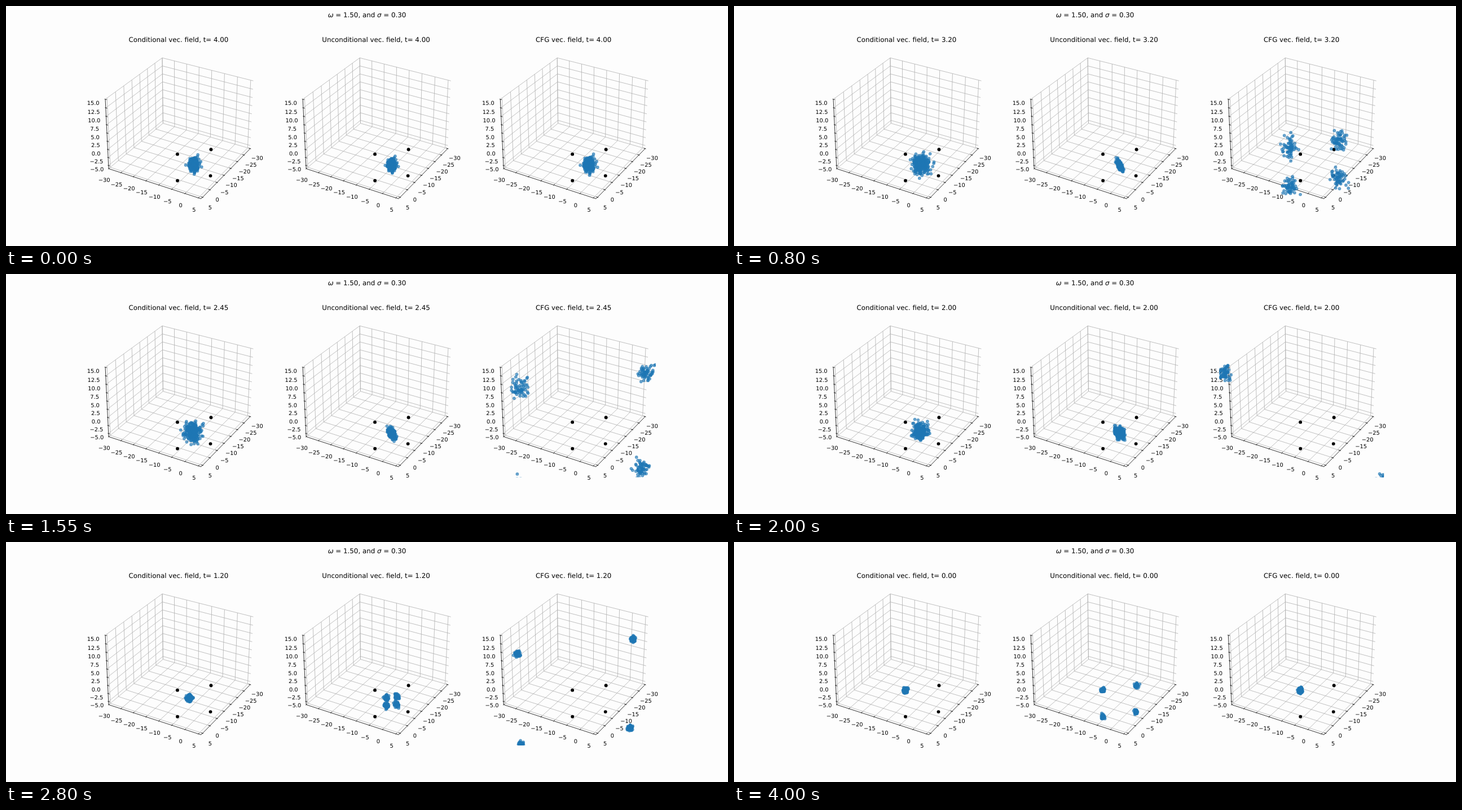
Recreate the animation shown at these times as an HTML page. Size 1280 px wide and 427 px high, loop 4050 ms.

```html
<!DOCTYPE html>
<html lang="en">
<head>
<meta charset="utf-8">
<title>Guided vector fields</title>
<style>
  html, body { margin: 0; width: 100%; height: 100%; overflow: hidden; background: #fdfdfd; }
  svg { display: block; width: 100vw; height: 100vh; }
  text { font-family: "DejaVu Sans", sans-serif; font-size: 9.877px; text-anchor: middle; text-rendering: geometricPrecision; }
  .title { font-size: 11.852px; }
  .grid { fill: none; stroke: #b0b0b0; stroke-width: .79; }
  .axis { fill: none; stroke: #000; stroke-width: .79; }
  .dot { fill: #1f77b4; fill-opacity: .6; stroke: #1f77b4; stroke-opacity: .6; stroke-width: 1.4; }
</style>
</head>
<body>
<svg id="stage" viewBox="0 0 1280 427">
  <defs><clipPath id="box"><rect x="160" y="69.6" width="291.8" height="291.8"/></clipPath></defs>
  <text class="title" x="640" y="20.2"><tspan font-style="italic">ω</tspan> = 1.50, and <tspan font-style="italic">σ</tspan> = 0.30</text>
</svg>
<script>
const LOOP = 4050, STEP = 50, STEPS = 81, COUNT = 256, PITCH = 350.12;
const NAMES = ["Conditional", "Unconditional", "CFG"];
const MEANS = [[4, -4, 4], [-4, 4, 4], [-4, 4, -4], [4, -4, -4]];

// t, conditional spread, in-plane and normal spread, own pull, shared pull, guided spread
const KEYS = [
  [0, .3, .3, .3, 0, 1, .3],
  [.8, .33, .3, .32, 2.03, 1.17, .33],
  [1.2, .42, .36, .45, 3.33, .77, .4],
  [1.6, .7, .33, .85, 4.65, .58, .65],
  [2, 1.05, .3, 1.25, 4.8, .4, 1],
  [2.85, 1.35, .22, 1.6, 2.4, .24, 1.4],
  [3.2, 1.28, .22, 1.6, 1.47, .17, 1.3],
  [4, .87, .72, .9, 0, 0, .95]
];

const stage = document.getElementById("stage");

function add(parent, tag, attrs, text) {
  const el = document.createElementNS("http://www.w3.org/2000/svg", tag);
  for (const k in attrs) el.setAttribute(k, attrs[k]);
  if (text !== undefined) el.textContent = text;
  parent.appendChild(el);
  return el;
}

// Plot limits: x and y share theirs, z has its own
const LO = -30, HI = 6, BOT = -6, TOP = 15;
const U = (HI - LO) / 12, V = (TOP - BOT) / 12;

// Perspective camera at azimuth 30, elevation 30, distance 10
const C = Math.cos(Math.PI / 6), S = 0.5;
const side = v => ((v - LO) / (HI - LO) - .5) * 1.190476;
const height = v => ((v - BOT) / (TOP - BOT) - .5) * .892857;
function project(x, y, z) {
  const a = side(x), b = side(y), c = height(z);
  const k = 1577.1 / (10 - C * (C * a + S * b) - S * c);
  return [309.8 + k * (C * b - S * a), 211.6 - k * (C * c - S * (C * a + S * b))];
}

const path = pts => "M" + pts.map(p => project(...p).map(v => v.toFixed(2)).join(" ")).join("L");
const range = (a, b, s) => Array.from({ length: Math.round((b - a) / s) + 1 }, (_, i) => a + i * s);

function drawFrame(g) {
  const grid = [], axis = [], labels = [];
  const gap = .94 * U, drop = .94 * V, near = .2 * U, far = .1 * U;
  const label = (p, text) => labels.push([project(...p), text.replace("-", "\u2212")]);
  for (const v of range(-30, 5, 5)) {
    grid.push(path([[v, HI, BOT], [v, LO, BOT], [v, LO, TOP]]));
    grid.push(path([[HI, v, BOT], [LO, v, BOT], [LO, v, TOP]]));
    axis.push(path([[v, HI - near, BOT], [v, HI + far, BOT]]));
    axis.push(path([[HI - near, v, BOT], [HI + far, v, BOT]]));
    label([v, HI + gap, BOT - drop], String(v));
    label([HI + gap, v, BOT - drop], String(v));
  }
  for (const v of range(-5, 15, 2.5)) {
    grid.push(path([[HI, LO, v], [LO, LO, v], [LO, HI, v]]));
    axis.push(path([[HI, LO + near, v], [HI, LO - far, v]]));
    label([HI + gap, LO - gap, v], v.toFixed(1));
  }
  axis.push(path([[LO, HI, BOT], [HI, HI, BOT], [HI, LO, BOT], [HI, LO, TOP]]));
  add(g, "path", { class: "grid", d: grid.join("") });
  add(g, "path", { class: "axis", d: axis.join("") });
  for (const [[x, y], text] of labels)
    add(g, "text", { x: x.toFixed(2), y: (y + 7.7).toFixed(2) }, text);
}

let seed = 20417;
function random() {
  seed = (seed + 0x6D2B79F5) | 0;
  let r = Math.imul(seed ^ (seed >>> 15), 1 | seed);
  r = (r + Math.imul(r ^ (r >>> 7), 61 | r)) ^ r;
  return ((r ^ (r >>> 14)) >>> 0) / 4294967296;
}
const gauss = () => Math.sqrt(-2 * Math.log(1 - random())) * Math.cos(2 * Math.PI * random());

// Each panel follows its own correlated random walk from a shared start
const start = Float32Array.from({ length: COUNT * 3 }, gauss);
const KEEP = .92, KICK = Math.sqrt(1 - KEEP * KEEP);
const noise = NAMES.map(() => {
  const walk = [start];
  for (let i = 1; i < STEPS; i++) walk.push(walk[i - 1].map(v => KEEP * v + KICK * gauss()));
  return walk;
});

const panels = NAMES.map((name, i) => {
  const g = add(stage, "g", { transform: `translate(${(i * PITCH).toFixed(2)} 0)` });
  drawFrame(g);
  const title = add(g, "text", { class: "title", x: 305.9, y: 63.8 });
  const cloud = add(g, "g", { "clip-path": "url(#box)" });
  for (const mean of MEANS) {
    const [cx, cy] = project(...mean);
    add(cloud, "circle", { cx, cy, r: 2.95 });
  }
  const dots = Array.from({ length: COUNT }, () => add(cloud, "circle", { class: "dot", r: 2.2 }));
  return { name, title, dots };
});

// Cubic Hermite through the keys
function sample(t) {
  let i = 0;
  while (i < KEYS.length - 2 && t > KEYS[i + 1][0]) i++;
  const a = KEYS[i], b = KEYS[i + 1], h = b[0] - a[0], u = (t - a[0]) / h;
  const slope = (j, c) => {
    const p = KEYS[Math.max(j - 1, 0)], q = KEYS[Math.min(j + 1, KEYS.length - 1)];
    return (q[c] - p[c]) / (q[0] - p[0]);
  };
  return a.map((v, c) => {
    const d = b[c] - v, m = slope(i, c) * h, n = slope(i + 1, c) * h;
    return v + u * (m + u * (3 * d - 2 * m - n + u * (m + n - 2 * d)));
  });
}

function draw(step) {
  const t = 4 - step * .05, decay = Math.exp(-t);
  const [, wide, flat, normal, own, shared, guided] = sample(t);
  // own pull, shared pull, in-plane spread, normal spread
  const modes = [[0, decay, wide, wide], [decay, 0, flat, normal], [own, shared, guided, guided]];
  panels.forEach(({ name, title, dots }, p) => {
    const [k, m, s, n] = modes[p], walk = noise[p][step];
    title.textContent = `${name} vec. field, t= ${Math.abs(t).toFixed(2)}`;
    dots.forEach((dot, i) => {
      const mu = MEANS[i % 4], at = MEANS[0];
      const [a, b, c] = walk.subarray(i * 3, i * 3 + 3);
      const along = (a + b) / 2 * n, across = (a - b) / 2 * s;
      const [x, y] = project(
        k * mu[0] + m * at[0] + along + across,
        k * mu[1] + m * at[1] + along - across,
        k * mu[2] + m * at[2] + c * s);
      dot.setAttribute("cx", x.toFixed(2));
      dot.setAttribute("cy", y.toFixed(2));
    });
  });
}

let shown = -1;
const origin = performance.now();
function tick() {
  const step = Math.floor((performance.now() - origin) % LOOP / STEP);
  if (step !== shown) draw(shown = step);
  requestAnimationFrame(tick);
}
tick();
</script>
</body>
</html>
```
